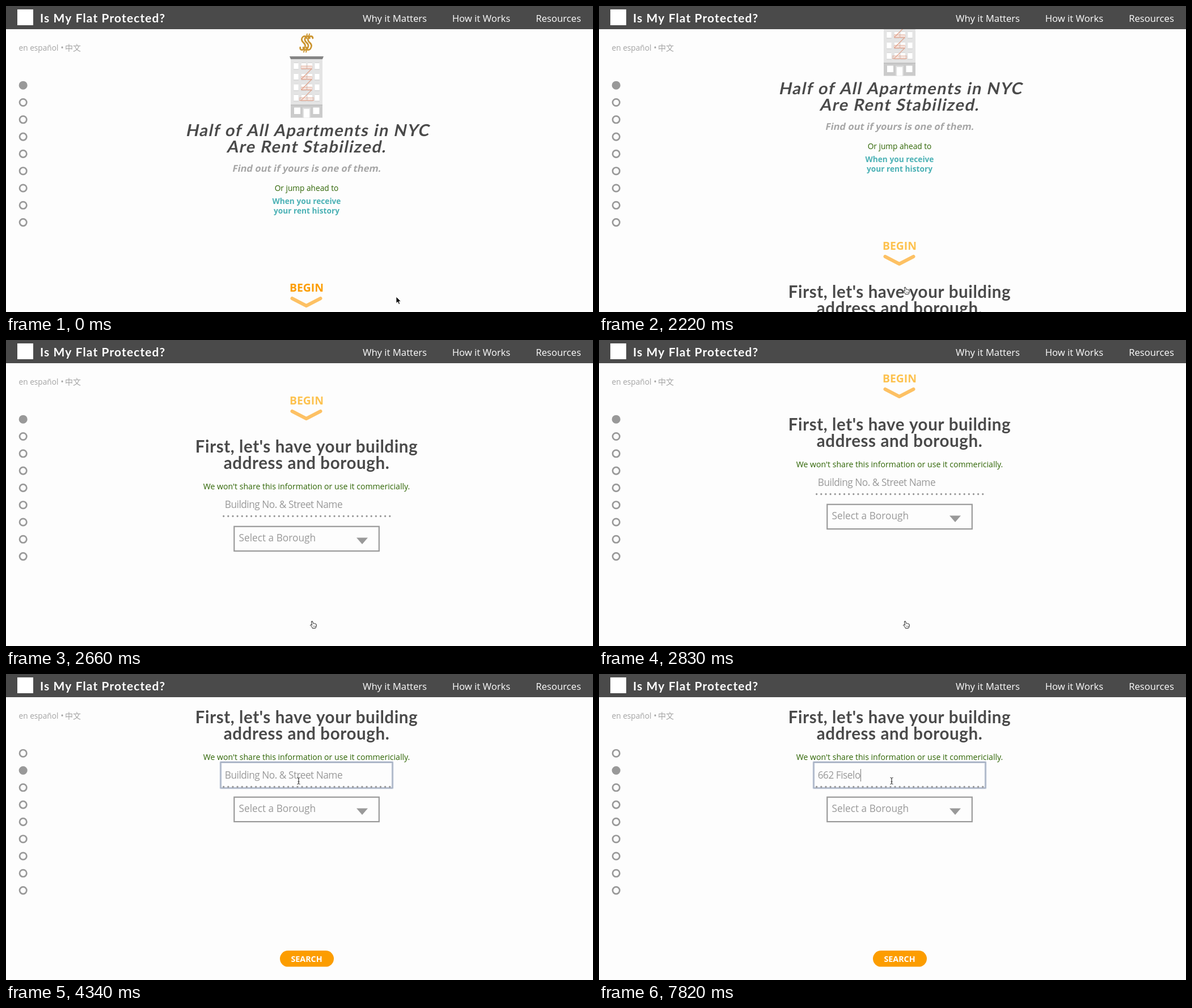
Animation of 1035x541 px, one loop 8000 ms. Source, as an HTML page with a canvas:

```html
<!DOCTYPE html>
<html lang="en">
<head>
<meta charset="utf-8">
<title>Rent check</title>
<style>
  html, body { margin: 0; width: 100%; height: 100%; overflow: hidden; background: #fdfdfd; }
  canvas { display: block; width: 100vw; height: 100vh; }
</style>
</head>
<body>
<canvas id="stage"></canvas>
<script>
const W = 1035, H = 541, LOOP = 8000;
const BODY = '"Open Sans", "Noto Sans", sans-serif';
const HEAD = 'Lato, "Open Sans", sans-serif';
const GRAY = '#999', DARK = '#4a4a4a', GREEN = '#2f6504', TEAL = '#4bb1b5', ORANGE = '#fc9d00', PALE = '#fdc164';
const ADDRESS = '662 Fiselo';
const KEYS = [4790, 4970, 5500, 5860, 6220, 6570, 6750, 6930, 7550, 7820];
const SCROLL_END = 503;

const canvas = document.getElementById('stage');
const ctx = canvas.getContext('2d');
const dpr = window.devicePixelRatio || 1;
canvas.width = W * dpr;
canvas.height = H * dpr;

const clamp = (v, a = 0, b = 1) => Math.min(b, Math.max(a, v));
const mix = (a, b, p) => a + (b - a) * p;
const smooth = p => p * p * (3 - 2 * p);
// Progress that advances in n equal jumps, the first one at start.
const steps = (t, start, gap, n) => clamp((Math.floor((t - start) / gap + 1e-6) + 1) / n);

function rect(x, y, w, h, color) {
  ctx.fillStyle = color;
  ctx.fillRect(x, y, w, h);
}

function line(points, color, width) {
  ctx.beginPath();
  points.forEach(([x, y]) => ctx.lineTo(x, y));
  ctx.strokeStyle = color;
  ctx.lineWidth = width;
  ctx.stroke();
}

function shape(points, fill, stroke, width = 1) {
  ctx.beginPath();
  points.forEach(([x, y]) => ctx.lineTo(x, y));
  ctx.closePath();
  ctx.fillStyle = fill;
  ctx.fill();
  if (stroke) {
    ctx.strokeStyle = stroke;
    ctx.lineWidth = width;
    ctx.stroke();
  }
}

function text(str, x, y, font, color, { align = 'center', gap = 0, skew = 0 } = {}) {
  ctx.save();
  ctx.translate(x, y);
  ctx.transform(1, 0, -skew, 1, 0, 0);
  ctx.font = font;
  ctx.letterSpacing = gap + 'px';
  ctx.textAlign = align;
  ctx.fillStyle = color;
  ctx.fillText(str, 0, 0);
  const width = ctx.measureText(str).width;
  ctx.restore();
  return width;
}

function dollars() {
  ctx.save();
  ctx.translate(530, 65.5);
  ctx.transform(1, 0, -0.18, 1, 0, 0);
  ctx.lineCap = 'round';
  ctx.strokeStyle = '#cb942f';
  ctx.lineWidth = 2.7;
  for (const x of [-5.5, 0, 5.5]) {
    ctx.beginPath();
    ctx.moveTo(x + 4, -8.5);
    ctx.bezierCurveTo(x + 2, -15, x - 6, -12, x - 4, -5.5);
    ctx.bezierCurveTo(x - 3, -1, x + 4, 0, x + 4, 5.5);
    ctx.bezierCurveTo(x + 4, 14, x - 4, 14, x - 4.5, 7.5);
    ctx.stroke();
  }
  for (const x of [-2, 2]) {
    line([[x, -16], [x, -11]], '#cb942f', 2);
    line([[x, 11], [x, 16]], '#cb942f', 2);
  }
  ctx.restore();
}

function building() {
  rect(502, 93, 56, 82, '#e4e4e4');
  shape([[500, 89], [560, 89], [558, 94], [502, 94]], '#858585');
  for (let row = 0; row < 4; row++) {
    const y = 100 + row * 18.7;
    for (const x of [507.5, 521, 532, 544.5]) {
      rect(x, y, 8, 11.5, '#fff');
      rect(x, y, 8, 1, '#d2d2d2');
      rect(x - 0.5, y + 11.5, 9, 1.5, '#d6d6d6');
    }
  }
  rect(502, 174.5, 56, 23, '#cbcbcb');
  rect(502, 174.5, 56, 1.5, '#bdbdbd');
  rect(508, 179.5, 11, 11.5, '#fff');
  rect(541.5, 179.5, 11, 11.5, '#fff');
  rect(523, 179.5, 14, 18, '#dedede');
  rect(525, 182, 10, 15.5, '#fff');

  const rust = '#dfa28b';
  for (let i = 0; i < 4; i++) {
    const y = 111 + i * 18.7, half = i === 3 ? 12.5 : 9.5;
    line([[530 - half, y], [530 + half, y]], rust, 1.2);
    line([[530 - half, y - 5], [530 + half, y - 5]], rust, 0.7);
    for (let x = -half; x <= half; x += half / 5) line([[530 + x, y - 5], [530 + x, y]], rust, 0.6);
    if (i < 3) line([[539, y], [521, y + 18]], rust, 1.3);
  }
}

function intro(hover) {
  dollars();
  building();
  text('Half of All Apartments in NYC', 531.5, 230, `700 29px ${HEAD}`, DARK, { gap: 1.52, skew: 0.2 });
  text('Are Rent Stabilized.', 529.5, 258.5, `700 29px ${HEAD}`, DARK, { gap: 1.52, skew: 0.2 });
  text('Find out if yours is one of them.', 529.5, 292.5, `700 16.6px ${BODY}`, '#a6a6a6', { skew: 0.2 });
  text('Or jump ahead to', 530, 326.5, `400 13.7px ${BODY}`, GREEN);
  text('When you receive', 530, 350, `700 13.7px ${BODY}`, TEAL);
  text('your rent history', 530, 367, `700 13.7px ${BODY}`, TEAL);
  text('BEGIN', 530, 504.7, `700 19.4px ${BODY}`, hover ? '#fdc24f' : ORANGE);
  ctx.lineCap = ctx.lineJoin = 'round';
  line([[504.5, 517], [529.5, 530], [554.5, 517]], PALE, 6);
  ctx.lineCap = 'butt';
  ctx.lineJoin = 'miter';
}

function form(t) {
  text("First, let's have your building", 530, 590, `700 29.5px ${HEAD}`, DARK, { gap: 0.6 });
  text('address and borough.', 530, 618.5, `700 29.5px ${HEAD}`, DARK, { gap: 0.6 });
  text("We won't share this information or use it commericially.", 530, 655.3, `400 14.1px ${BODY}`, GREEN);

  if (t >= 3800) {
    ctx.lineJoin = 'round';
    ctx.strokeStyle = 'rgba(150,165,195,.35)';
    ctx.lineWidth = 4;
    ctx.strokeRect(378.5, 659, 303, 45.6);
    ctx.strokeStyle = '#a3adc0';
    ctx.lineWidth = 1.8;
    ctx.strokeRect(378.5, 659, 303, 45.6);
    ctx.lineJoin = 'miter';
  }

  const count = KEYS.filter(k => t >= k).length;
  const field = `400 17.3px ${BODY}`, entry = { align: 'left', gap: -0.5 };
  const typed = ADDRESS.slice(0, count);
  const width = text(count ? typed : 'Building No. & Street Name', 385.7, 688.3, field, GRAY, entry);
  const blink = (t >= 4340 && t < 4790) || (t >= 7370 && t < 7550);
  if (t >= 3800 && !blink) rect(Math.round(385.7 + (count ? width : 0)), 671, 1, 22, '#777');

  ctx.lineCap = 'round';
  ctx.setLineDash([0, 8.14]);
  line([[383.7, 702.5], [677, 702.5]], GRAY, 3.3);
  ctx.setLineDash([]);
  ctx.lineCap = 'butt';

  ctx.strokeStyle = GRAY;
  ctx.lineWidth = 2.2;
  ctx.strokeRect(402.3, 720.7, 255.5, 43.4);
  text('Select a Borough', 410.5, 746.5, field, GRAY, { align: 'left' });
  shape([[618, 740.5], [638, 740.5], [628, 752]], GRAY);

  ctx.beginPath();
  ctx.roundRect(483, 992, 95, 28.6, 14.3);
  ctx.fillStyle = ORANGE;
  ctx.fill();
  text('SEARCH', 530, 1011.5, `700 14.3px ${BODY}`, '#fff');
}

function frame(active) {
  rect(0, 0, W, 41, DARK);
  rect(20, 6, 28, 28, '#fff');
  text('Is My Flat Protected?', 60, 28.5, `700 21px ${HEAD}`, '#fff', { align: 'left', gap: 1.1 });
  const nav = `400 16.7px ${BODY}`;
  text('Why it Matters', 685.5, 27.7, nav, '#fff');
  text('How it Works', 838, 27.7, nav, '#fff');
  text('Resources', 974, 27.7, nav, '#fff');

  const small = `400 13.7px ${BODY}`, pale = '#a3a3a3', left = { align: 'left' };
  text('en español', 22.5, 79, small, pale, left);
  text('•', 96.5, 79, small, pale, left);
  text('中文', 104, 79, '400 14px "Noto Sans CJK SC", "Noto Sans CJK", sans-serif', pale, left);

  for (let i = 0; i < 9; i++) {
    ctx.beginPath();
    ctx.arc(30.2, 140.2 + i * 30.3, 6.2, 0, 7);
    ctx.strokeStyle = ctx.fillStyle = GRAY;
    ctx.lineWidth = 2.7;
    ctx.stroke();
    if (i === active) ctx.fill();
  }
}

const cursors = {
  arrow() {
    shape([[0, 0], [0, 11.5], [2.7, 9], [4.6, 13.3], [6.6, 12.4], [4.8, 8.3], [8.2, 8.2]], '#000', '#fff', 0.8);
  },
  hand() {
    ctx.lineJoin = 'round';
    shape([[-3, -6], [-1.3, -6.4], [0.6, -2], [2, -2.6], [3.3, -1.6], [5, -1.6], [6, 0.5],
      [5.4, 3.6], [4.2, 6], [-0.8, 6.4], [-2.4, 3.4], [-5, 0.8], [-4, -0.4], [-2, 0.8]], '#fff', '#222', 1);
    for (const x of [0.6, 2.4, 4]) line([[x, 1.5], [x + 0.2, 4.2]], '#444', 0.6);
    ctx.lineJoin = 'miter';
  },
  beam() {
    line([[0, -5], [0, 5]], '#222', 1.1);
    line([[-2.5, -5.8], [-0.8, -5.4], [0, -4.6], [0.8, -5.4], [2.5, -5.8]], '#222', 1);
    line([[-2.5, 5.8], [-0.8, 5.4], [0, 4.6], [0.8, 5.4], [2.5, 5.8]], '#222', 1);
    line([[-1.5, 1.5], [1.5, 1.5]], '#222', 0.8);
  }
};

function pointer(t) {
  if (t < 2834) {
    const p = smooth(steps(t, 500, 92, 6));
    const x = mix(688, 541.5, p), y = mix(514, 503.5, p);
    return { x, y, kind: x < 566 ? 'hand' : 'arrow' };
  }
  if (t < 3100) {
    const p = steps(t, 2834, 88, 3);
    return { x: mix(541, 528.3, p), y: mix(503, 421.3, p), kind: 'arrow' };
  }
  const p = smooth(steps(t, 3100, 86, 6));
  const y = mix(421.3, 189, p);
  return { x: mix(528.3, 516, p), y, kind: y < 204 ? 'beam' : 'arrow' };
}

// Ease-out scroll, redrawn at a steady interval and on whole pixels.
function scrollAt(t) {
  if (t < 2220) return 0;
  const gap = 87.75;
  const at = 2220 + Math.floor((t - 2220) / gap) * gap;
  const rest = 1 - clamp((at - 2146) / 972);
  return Math.round(SCROLL_END * (1 - rest * rest));
}

function draw(t) {
  ctx.setTransform(dpr, 0, 0, dpr, 0, 0);
  rect(0, 0, W, H, '#fdfdfd');
  const mouse = pointer(t);

  ctx.save();
  ctx.translate(0, -scrollAt(t));
  intro(mouse.kind === 'hand' || t >= 2220);
  form(t);
  ctx.restore();

  frame(t < 3186 ? 0 : 1);
  ctx.save();
  ctx.translate(mouse.x, mouse.y);
  cursors[mouse.kind]();
  ctx.restore();
}

const start = performance.now();
function tick() {
  draw((performance.now() - start) % LOOP);
  requestAnimationFrame(tick);
}
tick();
</script>
</body>
</html>
```
